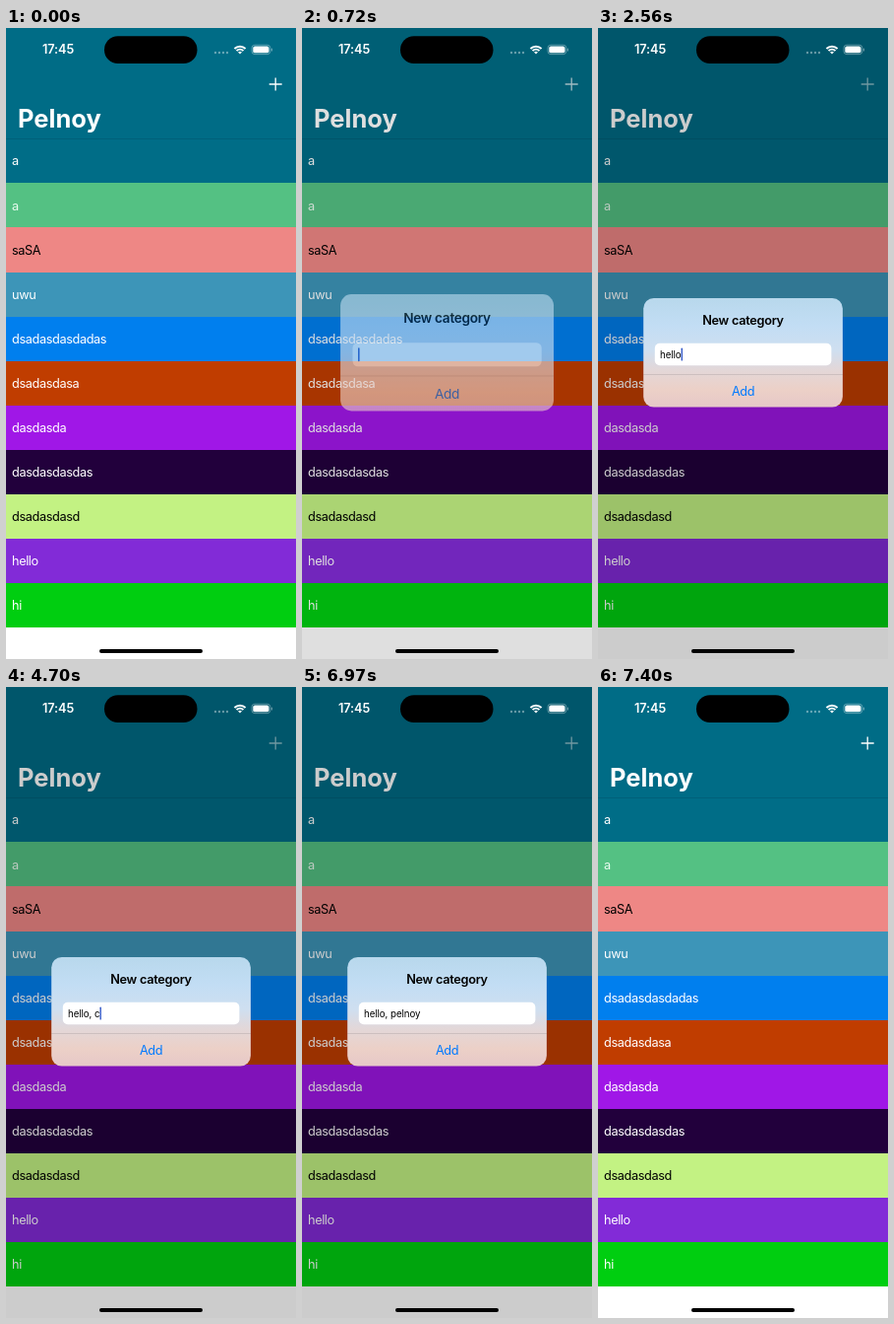
Animation of 295x640 px, one loop 8000 ms. Source, as an HTML page with a canvas:

```html
<!DOCTYPE html>
<html lang="en">
<head>
<meta charset="utf-8">
<title>Category list</title>
<style>
  html, body { margin: 0; width: 100%; height: 100%; overflow: hidden; background: #fff; }
  canvas { display: block; width: 295px; height: 640px; }
</style>
</head>
<body>
<canvas id="stage"></canvas>
<script>
const W = 295, H = 640, LOOP = 8000;
const TITLE = 'Pelnoy';
const FONT = 'Inter, Roboto, sans-serif';
const ROW_TOP = 112.3, ROW_H = 45.07;

const ratio = window.devicePixelRatio || 1;

function surface(canvas) {
  canvas.width = W * ratio;
  canvas.height = H * ratio;
  const context = canvas.getContext('2d');
  context.scale(ratio, ratio);
  return context;
}

const screen2d = surface(document.getElementById('stage'));
// The panel has its own layer so that it fades as one piece.
const panel2d = surface(document.createElement('canvas'));
let ctx = screen2d;

const rows = [
  ['a', '#006d87', '#fff'],
  ['a', '#54c183', '#e9fbef'],
  ['saSA', '#ee8785', '#000'],
  ['uwu', '#3d95b8', '#fff'],
  ['dsadasdasdadas', '#007fee', '#fff'],
  ['dsadasdasa', '#c03d00', '#fff'],
  ['dasdasda', '#a017e7', '#fff'],
  ['dasdasdasdas', '#22003c', '#fff'],
  ['dsadasdasd', '#c3f283', '#000'],
  ['hello', '#822bd7', '#fff'],
  ['hi', '#00ce10', '#fff']
];

// Tracks are lists of [time, value]; a value holds until the next time.
const typed = [[0, '']];
const type = (word, times) => times.forEach(
  (t, i) => typed.push([t, typed[typed.length - 1][1] + word[i]]));
type('hello', [2010, 2120, 2240, 2350, 2560]);
type(', c', [4170, 4420, 4530]);
typed.push([4940, 'hello, ']);
type(TITLE.toLowerCase(), [5200, 5640, 5850, 6380, 6480, 6620]);

const shown = [
  [0, 0], [500, 0.1], [610, 0.36], [720, 0.63], [820, 0.84], [930, 0.95], [1030, 1],
  [7080, 0.66], [7190, 0.34], [7290, 0.1], [7400, 0]
];
const caret = [
  [0, 1], [1180, 0.6], [1290, 0.2], [1500, 1], [3060, 0.6], [3170, 0.2],
  [3340, 0], [3510, 1], [4030, 0.2], [4170, 1], [6970, 0]
];

function at(track, t) {
  let value = track[0][1];
  for (const [time, v] of track) if (time <= t) value = v;
  return value;
}

function pill(x, y, w, h, r, fill) {
  ctx.beginPath();
  ctx.roundRect(x, y, w, h, r);
  ctx.fillStyle = fill;
  ctx.fill();
}

function text(str, x, y, size, weight, fill, spacing = 0, align = 'left') {
  ctx.font = `${weight} ${size}px ${FONT}`;
  ctx.letterSpacing = spacing + 'px';
  ctx.textAlign = align;
  ctx.fillStyle = fill;
  ctx.fillText(str, x, y);
}

function drawList(p) {
  ctx.fillStyle = '#fff';
  ctx.fillRect(0, 0, W, H);
  ctx.fillStyle = '#006c86';
  ctx.fillRect(0, 0, W, ROW_TOP);
  rows.forEach(([label, fill, ink], i) => {
    const y = ROW_TOP + i * ROW_H;
    const top = Math.round(y);
    ctx.fillStyle = fill;
    ctx.fillRect(0, top, W, Math.round(y + ROW_H) - top);
    text(label, 6, y + ROW_H / 2 + 4.6, 12.76, 400, ink, -0.4);
  });
  ctx.fillStyle = 'rgba(0,40,55,0.18)';
  ctx.fillRect(0, 112, W, 1);
  text(TITLE, 12, 100.5, 25.5, 700, '#fff');

  ctx.strokeStyle = `rgba(255,255,255,${1 - 0.45 * p})`;
  ctx.lineWidth = 1.3;
  ctx.beginPath();
  ctx.moveTo(267.7, 57);
  ctx.lineTo(280.7, 57);
  ctx.moveTo(274.2, 50.5);
  ctx.lineTo(274.2, 63.5);
  ctx.stroke();
}

function drawWifi(x, y) {
  const wedge = r => ctx.arc(x, y, r, -Math.PI * 0.75, -Math.PI * 0.25);
  ctx.strokeStyle = ctx.fillStyle = '#fff';
  ctx.lineWidth = 1.9;
  for (const r of [7.9, 4.9]) {
    ctx.beginPath();
    wedge(r);
    ctx.stroke();
  }
  ctx.beginPath();
  ctx.moveTo(x, y);
  wedge(2.8);
  ctx.fill();
}

function drawStatus() {
  text('17:45', 37, 26.4, 12.76, 600, '#fff', -0.1);
  pill(100, 8.3, 94.5, 27.7, 13.85, '#000');
  for (let i = 0; i < 4; i++) {
    pill(211.8 + i * 4, 23.8, 2.4, 2.4, 1.2, 'rgba(255,255,255,0.4)');
  }
  drawWifi(238, 26.6);

  ctx.strokeStyle = 'rgba(255,255,255,0.45)';
  ctx.lineWidth = 0.8;
  ctx.beginPath();
  ctx.roundRect(250, 17.2, 18.8, 9.4, 3);
  ctx.stroke();
  pill(251.3, 18.5, 16.2, 6.8, 1.9, '#fff');
  pill(269.8, 20.4, 1, 3, 0.5, 'rgba(255,255,255,0.5)');

  pill(95, 630, 105, 4, 2, '#000');
}

function panelFill() {
  const g = ctx.createLinearGradient(0, 274, 0, 384.5);
  [[0, '#b8d8ec'], [0.25, '#c2ddf4'], [0.48, '#cfdff0'],
   [0.66, '#e3d7d8'], [0.84, '#ecd0c7'], [1, '#e6c8c8']].forEach(s => g.addColorStop(...s));
  return g;
}

function drawPanel(t, scale) {
  const cx = W / 2, cy = 329.2;
  ctx.clearRect(0, 0, W, H);
  ctx.save();
  ctx.translate(cx, cy);
  ctx.scale(scale, scale);
  ctx.translate(-cx, -cy);
  pill(46.2, 274, 202.7, 110.5, 10.5, panelFill());
  text('New category', cx, 301, 12.76, 600, '#000', -0.3, 'center');
  pill(57.8, 319.8, 179.6, 22.5, 5, '#fff');
  ctx.fillStyle = 'rgba(60,60,67,0.18)';
  ctx.fillRect(46.2, 351, 202.7, 0.8);
  text('Add', cx, 373, 12.76, 400, '#007aff', -0.4, 'center');

  const value = at(typed, t);
  text(value, 63, 334.6, 9.76, 400, '#000', -0.08);
  ctx.globalAlpha = at(caret, t);
  pill(63 + ctx.measureText(value).width, 324.6, 1.4, 13, 0.7, '#3358c8');
  ctx.restore();
}

function draw(t) {
  const p = at(shown, t);
  drawList(p);
  if (p > 0) {
    ctx.fillStyle = `rgba(0,0,0,${0.2 * p})`;
    ctx.fillRect(0, 0, W, H);

    // The panel shrinks into place on entry and only fades on exit.
    ctx = panel2d;
    drawPanel(t, t < LOOP / 2 ? 1 + 0.19 * (1 - p) : 1);
    ctx = screen2d;
    ctx.globalAlpha = p;
    ctx.drawImage(panel2d.canvas, 0, 0, W, H);
    ctx.globalAlpha = 1;
  }
  drawStatus();
}

const start = performance.now();

function tick() {
  draw((performance.now() - start) % LOOP);
  requestAnimationFrame(tick);
}

tick();
</script>
</body>
</html>
```
